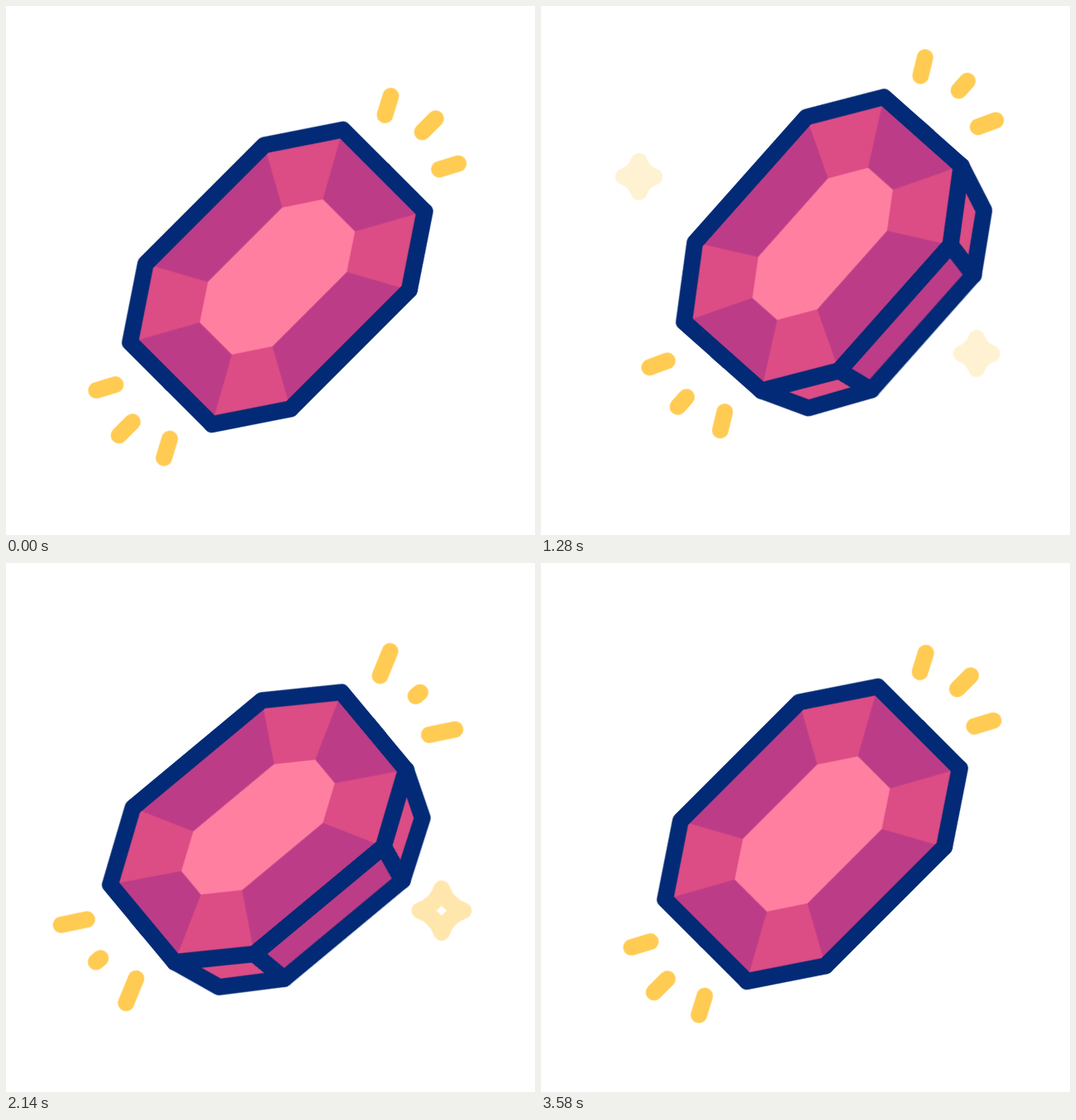
An HTML page without scripts for the animation above (3600 ms loop, 640 px wide and 640 px high).

```html
<!DOCTYPE html>
<html lang="en">
<head>
<meta charset="utf-8">
<title>Gem</title>
<style>
  html, body { margin: 0; width: 100%; height: 100%; overflow: hidden; background: #fff; }
  svg { display: block; width: 640px; height: 640px; }

  svg * {
    animation-duration: 3600ms;
    animation-iteration-count: infinite;
    animation-timing-function: cubic-bezier(.37, 0, .63, 1);
  }

  .line, .long, .end { stroke: #032a76; stroke-width: 20; stroke-linejoin: round; }
  .line { fill: none; }
  .purple, .long { fill: #bc3c87; }
  .pink, .end { fill: #dc4c85; }
  .light { fill: #ff7fa1; }
  .ray, .spark { fill: none; stroke: #ffcb52; stroke-width: 20; stroke-linecap: round; stroke-linejoin: round; }

  /* Sway of the whole gem: one axis per group */
  .x { animation-name: x; }
  .y { animation-name: y; }
  .turn { animation-name: turn; }
  @keyframes x {
    0%, 3.33% { transform: translateX(328.3px); }
    20% { transform: translateX(365.4px); }
    55.6% { transform: translateX(304px); }
    85.5%, 100% { transform: translateX(328.3px); }
  }
  @keyframes y {
    0%, 5% { transform: translateY(327.8px); }
    38.9% { transform: translateY(286.8px); }
    67.8% { transform: translateY(327.2px); }
    92.8%, 100% { transform: translateY(327.8px); }
  }
  @keyframes turn {
    0%, 3.33% { transform: rotate(-45deg); }
    21.9% { transform: rotate(-57.8deg); }
    51.9% { transform: rotate(-35.9deg); }
    74.7% { transform: rotate(-51.5deg); }
    92.8%, 100% { transform: rotate(-45deg); }
  }

  /* Tilt: the face narrows while the side walls open */
  .half { animation-name: narrow; }
  .end { animation-name: end; }
  .long { animation-name: long; }
  @keyframes narrow {
    0%, 3.33% { transform: translateY(0); }
    21.7% { transform: translateY(-6.5px); animation-timing-function: linear; }
    59.4%, 75% { transform: translateY(-9px); }
    93.9%, 100% { transform: translateY(0); }
  }
  @keyframes end {
    0%, 3.33% { d: path("M182 70L101.5 124L101.5 124L182 70Z"); }
    21.7% { d: path("M182 63.5L101.5 117.5L93 161.7L160 119.5Z"); animation-timing-function: linear; }
    59.4%, 75% { d: path("M182 61L101.5 115L93 161.3L160 118.6Z"); }
    93.9%, 100% { d: path("M182 70L101.5 124L101.5 124L182 70Z"); }
  }
  @keyframes long {
    0%, 3.33% { d: path("M101.5 124L101.5 124L-101.5 124L-101.5 124Z"); }
    21.7% { d: path("M101.5 117.5L93 161.7L-93 161.7L-101.5 117.5Z"); animation-timing-function: linear; }
    59.4%, 75% { d: path("M101.5 115L93 161.3L-93 161.3L-101.5 115Z"); }
    93.9%, 100% { d: path("M101.5 124L101.5 124L-101.5 124L-101.5 124Z"); }
  }

  /* Rays pulse in alternation */
  .outer { animation-name: outer; }
  .middle { animation-name: middle; }
  @keyframes outer {
    0%, 3.33%, 99.4%, 100% { d: path("M0 0H24"); }
    17.5%, 44.4%, 74.4% { d: path("M0 0H7"); }
    29.4%, 59.4%, 90.6% { d: path("M0 0H32"); }
  }
  @keyframes middle {
    0%, 3.33%, 99.4%, 100% { d: path("M0 0H23"); }
    17.5%, 44.4%, 74.4% { d: path("M0 0H31"); }
    29.4%, 59.4%, 90.6% { d: path("M0 0H7"); }
  }

  .spark {
    vector-effect: non-scaling-stroke;
    opacity: 0;
    animation-name: spark;
    animation-timing-function: linear;
  }
  @keyframes spark {
    0% { transform: scale(.18); opacity: 0; }
    3.9% { transform: scale(.76); }
    5% { opacity: 1; }
    10% { transform: scale(.83); }
    16.5% { transform: scale(.9); }
    20% { transform: scale(.965); }
    22.2% { transform: scale(.94); }
    22.5% { opacity: 1; }
    27.6% { opacity: 0; }
    27.8%, 100% { transform: scale(.16); opacity: 0; }
  }
</style>
</head>
<body>
<svg viewBox="0 0 640 640">
  <defs>
    <!-- Lower half of the face, long axis horizontal; overlaps the axis to hide the seam -->
    <g id="half">
      <path class="purple" d="M-182 -3V70L-101.5 124H101.5L182 70V-3Z"/>
      <path id="corner" class="pink" d="M182 70L101.5 124L63.6 55.2L105.4 27.6Z"/>
      <use href="#corner" transform="scale(-1 1)"/>
      <path class="light" d="M-105.4 -3V27.6L-63.6 55.2H63.6L105.4 27.6V-3Z"/>
      <path class="line" d="M-182 -3V70L-101.5 124H101.5L182 70V-3"/>
    </g>
  </defs>

  <g class="x"><g class="y"><g class="turn">
    <path class="end" d="M182 70L101.5 124L101.5 124L182 70Z"/>
    <g transform="scale(-1 1)"><path class="end" d="M182 70L101.5 124L101.5 124L182 70Z"/></g>
    <path class="long" d="M101.5 124L101.5 124L-101.5 124L-101.5 124Z"/>
    <g transform="scale(1 -1)"><use class="half" href="#half"/></g>
    <use class="half" href="#half"/>

    <g>
      <g transform="translate(230.6 -46.5) rotate(-28)"><path class="ray outer" d="M0 0H24"/></g>
      <g transform="translate(248 0)"><path class="ray middle" d="M0 0H23"/></g>
      <g transform="translate(230.6 46.5) rotate(28)"><path class="ray outer" d="M0 0H24"/></g>
    </g>
    <g transform="rotate(180)">
      <g transform="translate(230.6 -46.5) rotate(-28)"><path class="ray outer" d="M0 0H24"/></g>
      <g transform="translate(248 0)"><path class="ray middle" d="M0 0H23"/></g>
      <g transform="translate(230.6 46.5) rotate(28)"><path class="ray outer" d="M0 0H24"/></g>
    </g>
  </g></g></g>

  <g transform="translate(118.5 206.5)">
    <path class="spark" style="animation-delay: 335ms" d="M0 -50Q12.9 -12.9 50 0Q12.9 12.9 0 50Q-12.9 12.9 -50 0Q-12.9 -12.9 0 -50Z"/>
  </g>
  <g transform="translate(527 420.5)">
    <path class="spark" style="animation-delay: 1235ms" d="M0 -50Q12.9 -12.9 50 0Q12.9 12.9 0 50Q-12.9 12.9 -50 0Q-12.9 -12.9 0 -50Z"/>
  </g>
  <g transform="translate(218.3 107.5)">
    <path class="spark" style="animation-delay: 2205ms" d="M0 -50Q12.9 -12.9 50 0Q12.9 12.9 0 50Q-12.9 12.9 -50 0Q-12.9 -12.9 0 -50Z"/>
  </g>
</svg>
</body>
</html>
```
